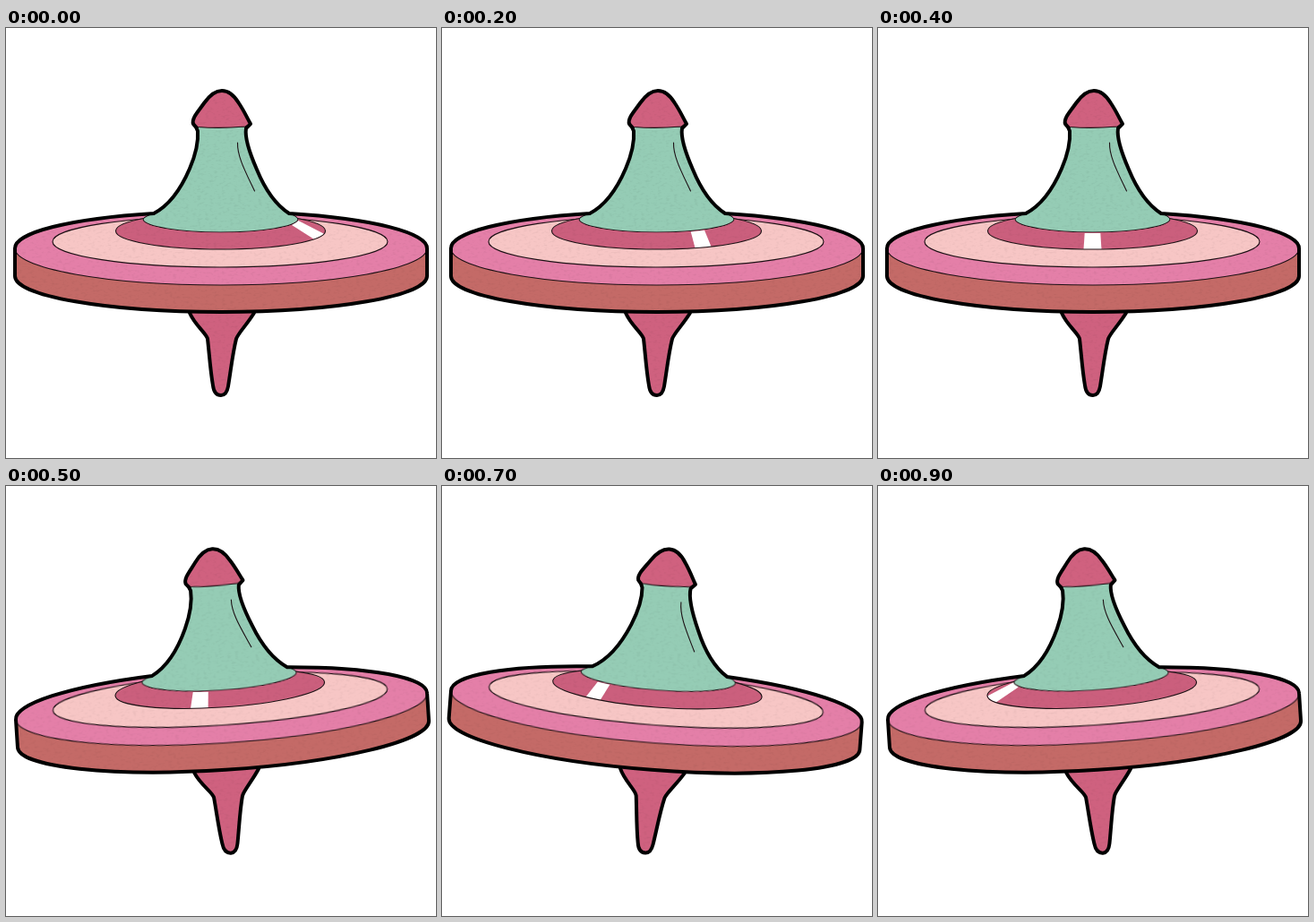
An HTML page for the animation above (1 s loop, 480 px wide and 480 px high).

```html
<!DOCTYPE html>
<html lang="en">
<head>
<meta charset="utf-8">
<title>Spinning top</title>
<style>
  html, body { margin: 0; width: 100%; height: 100%; overflow: hidden; background: #fff; }
  svg { display: block; width: 100vw; height: 100vh; }
  .thin { stroke: #1c1014; stroke-width: 1.1; }
  .bold { fill: none; stroke: #000; stroke-width: 4; stroke-linejoin: round; stroke-linecap: round; }
</style>
</head>
<body>
<svg viewBox="0 0 480 480">
  <defs>
    <!-- faint paper grain over the flat colours -->
    <filter id="grain" x="0" y="0" width="480" height="480" filterUnits="userSpaceOnUse" color-interpolation-filters="sRGB">
      <feTurbulence type="fractalNoise" baseFrequency="0.22 0.4" numOctaves="2" seed="4"/>
      <feColorMatrix values="0.14 0 0 0 0.93  0.14 0 0 0 0.93  0.14 0 0 0 0.93  0 0 0 0 1" result="paper"/>
      <feComposite in="SourceGraphic" in2="paper" operator="arithmetic" k1="1" result="tinted"/>
      <feComposite in="tinted" in2="SourceGraphic" operator="in"/>
    </filter>
  </defs>
  <g id="top">
    <g filter="url(#grain)">
      <path id="stemFill" fill="#cf617f"/>
      <path fill="#c46a67" d="M10,246 V277 A230 40 0 0 0 470,277 V246 Z"/>
      <ellipse class="thin" fill="#e47fa8" cx="240" cy="246" rx="230" ry="41"/>
      <ellipse class="thin" fill="#f7c6c5" cx="239" cy="238.5" rx="187" ry="28.5"/>
      <ellipse fill="#cb5f7d" cx="239.5" cy="226.5" rx="117" ry="20.5"/>
    </g>
    <path id="shine" fill="#fff"/>
    <ellipse class="thin" fill="none" cx="239.5" cy="226.5" rx="117" ry="20.5"/>
    <g filter="url(#grain)">
      <path class="thin" fill="#95ccb5" d="M214,110 C216,126 211,143 205,157 C196,178 184,197 165,207 C159,209 153,211 153,214
        A86.7 15 0 0 0 326,214 C326,211 322,209 316,207 C299,196 287,175 280,158 C273,142 266,124 268,110 Z"/>
      <path class="thin" fill="#d0617f" d="M209,107 C207,101 214,94 221,84 C228,74 234,70 241,70 C248,70 254,74 260,84
        C266,93 269,100 273,107 L267,110 Q240,112.5 214,110.5 Z"/>
    </g>
    <path class="thin" fill="none" stroke-linecap="round" d="M258.5,128 C258,143 267,160 277.5,182"/>
    <path id="stemLine" class="bold"/>
    <path class="bold" d="M165,207 A230 41 0 0 0 10,246 V277 A230 40 0 0 0 470,277 V246 A230 41 0 0 0 316,207
      C299,196 287,175 280,158 C273,142 266,124 268,112 L273,107 C269,100 266,93 260,84 C254,74 248,70 241,70
      C234,70 228,74 221,84 C214,94 207,101 209,107 Q213,111 214,115 C215,128 211,143 205,157 C196,178 184,197 165,207 Z"/>
  </g>
</svg>
<script>
  const byId = id => document.getElementById(id);
  const stem = 'M205,318 C211,332 224,341 225,347 C227,364 228,382 231,399 C232,407 236,410 240,410 ' +
    'C244,410 247,406 248,400 C251,382 253,363 257,347 C259,341 269,331 277,318';
  byId('stemFill').setAttribute('d', stem + 'Z');
  byId('stemLine').setAttribute('d', stem);

  const STEP = 100, STEPS = 10;
  const tilts = [0, -3.7, 0, 4.4];
  const hub = { x: 239.5, y: 214, rx: 87, ry: 15 };
  const rim = { x: 239.5, y: 226.5, rx: 117, ry: 20.5 };

  // Angles of the highlight, in degrees from the front of the ring
  const hubAngles = [76, 50, 32, 15.5, 0, -14.5, -29, -44, -65, -81];
  const rimAngles = [72, 45, 26.5, 13, 0, -12, -24.3, -37.4, -53, -78];

  function pointOn(e, degrees) {
    const a = degrees * Math.PI / 180;
    return `${(e.x + e.rx * Math.sin(a)).toFixed(2)},${(e.y + e.ry * Math.cos(a)).toFixed(2)}`;
  }

  function shinePath(step) {
    const h = hubAngles[step], r = rimAngles[step];
    const hw = 5.8 + 5 * Math.pow(Math.abs(h) / 80, 4);
    const rw = 4.9 + 6 * Math.pow(Math.abs(r) / 78, 5);
    return `M${pointOn(hub, h - hw)} L${pointOn(rim, r - rw)} ` +
      `A${rim.rx} ${rim.ry} 0 0 0 ${pointOn(rim, r + rw)} L${pointOn(hub, h + hw)} Z`;
  }

  function draw(ms) {
    const step = Math.floor(ms / STEP) % STEPS;
    byId('top').setAttribute('transform', `rotate(${tilts[step % 4]} 240 238)`);
    byId('shine').setAttribute('d', shinePath(step));
  }

  let start = null;
  function tick(now) {
    if (start === null) start = now;
    draw(now - start);
    requestAnimationFrame(tick);
  }
  draw(0);
  requestAnimationFrame(tick);
</script>
</body>
</html>
```
